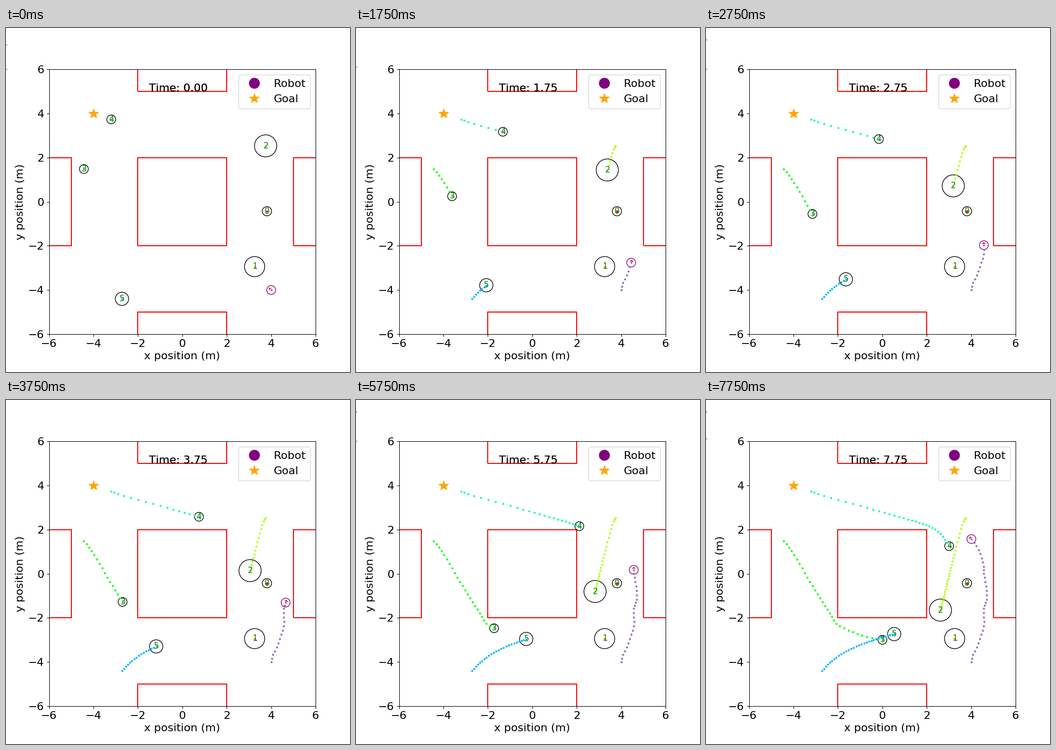
Animation of 700 by 700 pixels, one loop 8000 ms. Source, as a matplotlib script:

```python
import math

import matplotlib
import matplotlib.pyplot as plt
import numpy as np
from matplotlib import patches
from matplotlib.animation import FuncAnimation
from matplotlib.lines import Line2D

STEPS = 32
INTERVAL = 250
FONT = 16
LABEL_OFFSET = 0.11
ROBOT_RADIUS = 0.2

plt.rcParams["font.family"] = "DejaVu Sans"
plt.rcParams["text.kerning_factor"] = 6


def track(*keys):
    """Smooth path through (step, x, y) keys: one position per step."""
    keys = np.array(keys, dtype=float)
    t, pts = keys[:, 0], keys[:, 1:]
    if len(keys) == 1:
        return np.repeat(pts, STEPS, axis=0)
    slopes = np.gradient(pts, t, axis=0, edge_order=2)
    steps = np.arange(STEPS)
    i = np.clip(np.searchsorted(t, steps, side="right") - 1, 0, len(t) - 2)
    span = (t[i + 1] - t[i])[:, None]
    u = (steps - t[i])[:, None] / span
    ease = u * u * (3 - 2 * u)
    return (pts[i] + (pts[i + 1] - pts[i]) * ease
            + span * slopes[i] * u * (1 - u) ** 2
            - span * slopes[i + 1] * u * u * (1 - u))


robot_path = track(
    (0, 4.0, -4.0), (2, 4.07, -3.67), (4, 4.25, -3.33), (7, 4.45, -2.76),
    (9, 4.56, -2.38), (13, 4.57, -1.58), (16, 4.685, -1.16),
    (19, 4.67, -0.56), (22, 4.57, 0.02), (24, 4.56, 0.33),
    (27, 4.41, 0.9), (31, 4.01, 1.57))

# Radius and path of each numbered person.
humans = [
    (0.21, track((0, 3.81, -0.43))),
    (0.455, track((0, 3.255, -2.94))),
    (0.5, track((0, 3.75, 2.53), (2, 3.645, 2.36), (4, 3.535, 2.03),
                (9, 3.28, 1.05), (15, 3.05, 0.14), (19, 2.935, -0.345),
                (31, 2.615, -1.65))),
    (0.2, track((0, -4.43, 1.48), (2, -4.2, 1.19), (11, -3.145, -0.555),
                (19, -2.265, -1.95), (21, -2.08, -2.26),
                (23, -1.72, -2.47), (31, 0.005, -2.995))),
    (0.2, track((0, -3.2, 3.73), (2, -2.89, 3.62), (4, -2.31, 3.45),
                (9, -0.69, 2.99), (15, 0.75, 2.58), (21, 1.83, 2.26),
                (24, 2.25, 2.09), (31, 3.01, 1.25))),
    (0.3, track((0, -2.715, -4.4), (7, -2.07, -3.785), (11, -1.64, -3.515),
                (19, -0.71, -3.11), (31, 0.535, -2.735))),
]

fig, ax = plt.subplots(figsize=(7, 7), dpi=100)
ax.set_xlim(-6, 6)
ax.set_ylim(-6, 6)
ax.set_xticks(range(-6, 7, 2))
ax.set_yticks(range(-6, 7, 2))
ax.tick_params(labelsize=FONT)
ax.set_xlabel("x position (m)", fontsize=FONT)
ax.set_ylabel("y position (m)", fontsize=FONT)

for x, y, w, h in [(-2, -2, 4, 4), (-8, -2, 3, 4), (5, -2, 3, 4),
                   (-2, 5, 4, 3), (-2, -8, 4, 3)]:
    ax.add_patch(patches.Rectangle((x, y), w, h, fill=False,
                                   edgecolor="red", linewidth=1.5))

goal = Line2D([-4], [4], color="orange", marker="*", linestyle="None",
              markersize=15)
ax.add_line(goal)
robot_key = Line2D([], [], color="purple", marker="o", linestyle="None",
                   markersize=15)
ax.legend([robot_key, goal], ["Robot", "Goal"], fontsize=FONT,
          loc="upper right")

# The clock is drawn twice, which gives it slightly heavier edges.
clocks = [ax.text(-1.5, 5, "", fontsize=FONT) for _ in range(2)]


class Agent:
    """A ring that leaves a dotted trail, with an optional number."""

    def __init__(self, path, radius, ring_color, dot_color, label=None):
        self.path = path
        self.ring = ax.add_patch(patches.Circle(
            path[0], radius, fill=False, edgecolor=ring_color, linewidth=1))
        self.trail = ax.plot([], [], "o", color=dot_color, markersize=2)[0]
        self.label = label and ax.text(0, 0, label, color="green",
                                       fontsize=12)

    def move(self, step):
        self.ring.center = self.path[step]
        self.trail.set_data(*self.path[:step + 1].T)
        if self.label:
            self.label.set_position(self.path[step] - LABEL_OFFSET)


hues = matplotlib.colormaps["hsv"].resampled(10)
agents = [Agent(path, radius, "black", hues(i), str(i))
          for i, (radius, path) in enumerate(humans)]
agents.append(Agent(robot_path, ROBOT_RADIUS, "purple", "tab:purple"))

arrow = ax.add_patch(patches.FancyArrowPatch(
    (0, 0), (1, 1), color="red",
    arrowstyle=patches.ArrowStyle("->", head_length=2, head_width=2)))

# Slivers of two cut-off lines of text flicker at the left edge.
rng = np.random.default_rng(4)
sliver_rows = [rng.choice([np.nan, 23, 34], STEPS),
               rng.choice([np.nan, 78, 83], STEPS)]
slivers = [fig.add_artist(Line2D([0.5 / 700] * 2, [0, 0], color="0.3",
                                 linewidth=0.72, solid_capstyle="butt"))
           for _ in sliver_rows]


def heading(step):
    if step == 0:
        return math.radians(135)
    dx, dy = robot_path[step] - robot_path[step - 1]
    return math.atan2(dy, dx)


def update(step):
    for clock in clocks:
        clock.set_text(f"Time: {step * INTERVAL / 1000:.2f}")
    for agent in agents:
        agent.move(step)

    angle = heading(step)
    pos = robot_path[step]
    arrow.set_positions(pos, pos + ROBOT_RADIUS * np.array(
        [math.cos(angle), math.sin(angle)]))

    for line, rows in zip(slivers, sliver_rows):
        line.set_ydata([1 - (rows[step] - 1) / 700,
                        1 - (rows[step] + 2) / 700])
    return []


anim = FuncAnimation(fig, update, frames=STEPS, interval=INTERVAL,
                     repeat=True, repeat_delay=0, blit=False)
plt.show()
```
